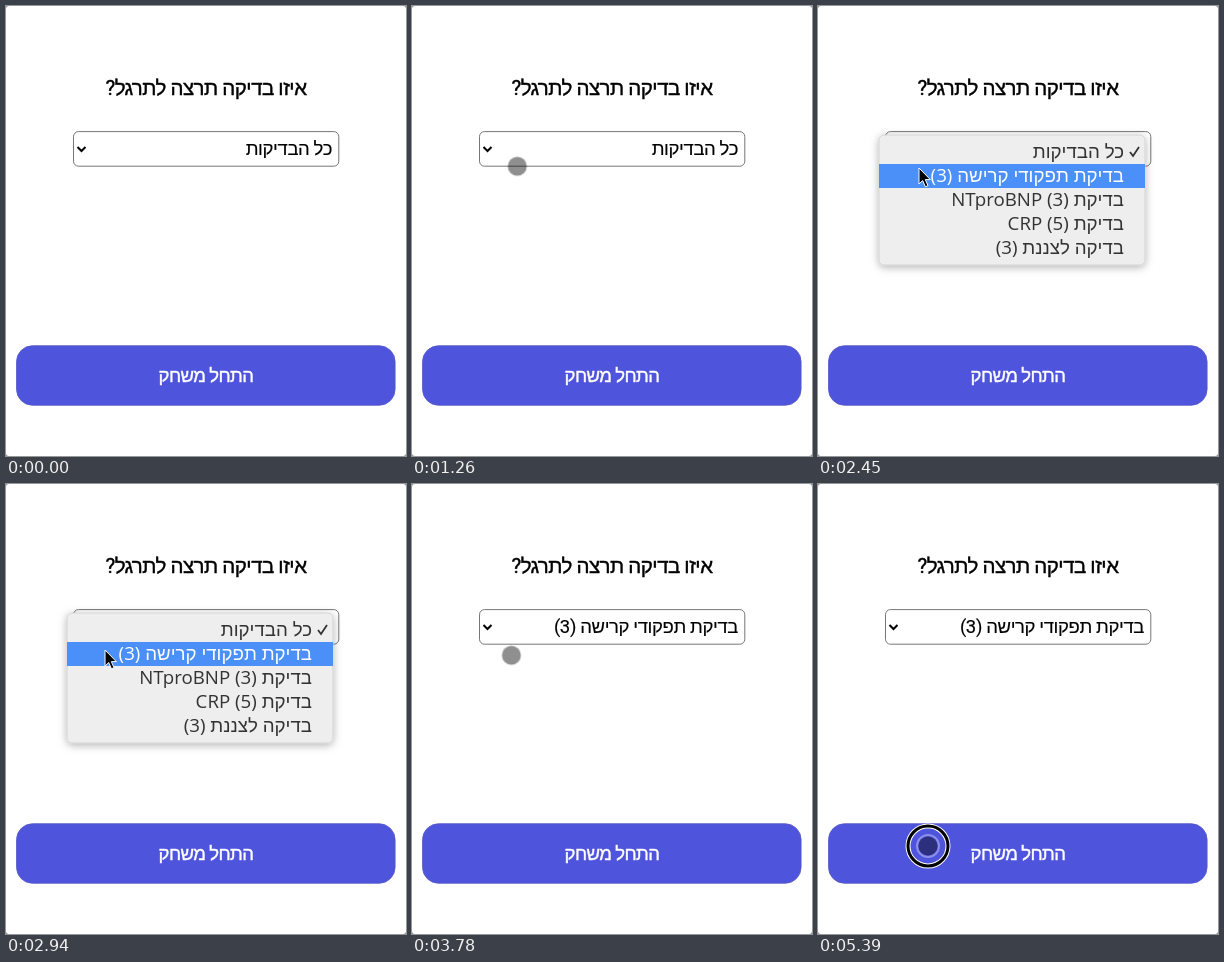
These frames come from a looping animation (400 px wide and 450 px high, 5460 ms). An HTML page:

```html
<!DOCTYPE html>
<html lang="he">
<head>
<meta charset="utf-8">
<title>בחירת בדיקה</title>
<style>
html, body { margin: 0; height: 100%; overflow: hidden; background: #fff; }
svg { display: block; width: 400px; height: 450px; }
text { direction: rtl; font-family: Roboto, "Open Sans", "Liberation Sans", sans-serif; }
.title { font-size: 20.5px; letter-spacing: -.5px; stroke: #000; stroke-width: .4; }
.value { font-size: 18.5px; letter-spacing: -.38px; stroke: #000; stroke-width: .15; }
.start { font-size: 18.5px; letter-spacing: -.6px; fill: #fff; stroke: #fff; stroke-width: .4; }
.menu text { font-family: "Open Sans", "Liberation Sans", sans-serif; font-size: 18.7px; fill: #333; }
.menu .lit text { fill: #fff; }
.mid { text-anchor: middle; }
.anim, .anim * { animation-duration: 5460ms; animation-iteration-count: infinite; }
.all, .picked, .menu, .lit, .ring, .arrow, .dot { animation-timing-function: step-end; }

.all { animation-name: all; }
.picked { animation-name: picked; }
.menu { animation-name: menu; }
.lit { animation-name: lit; }
.arrow { animation-name: arrow; }
.dot { animation-name: dot; }
.ring { animation-name: ring; }
.path { animation-name: path; animation-timing-function: ease-in-out; }

@keyframes all { 0% { opacity: 1 } 64.74%, 100% { opacity: 0 } }
@keyframes picked { 0% { opacity: 0 } 64.74%, 100% { opacity: 1 } }
@keyframes menu {
  0% { opacity: 0 } 30.77% { opacity: 1 }
  64.1% { opacity: 1; animation-timing-function: linear }
  66.6%, 100% { opacity: 0 }
}
@keyframes lit { 0% { opacity: 0 } 32.05% { opacity: 1 } 62.82% { opacity: 0 } 64.1%, 100% { opacity: 1 } }
@keyframes arrow { 0% { opacity: 0 } 30.77% { opacity: 1 } 66.6%, 100% { opacity: 0 } }
@keyframes dot { 0% { opacity: 0 } 8.97% { opacity: 1 } 30.77% { opacity: 0 } 66.6%, 100% { opacity: 1 } }
@keyframes ring { 0% { opacity: 0 } 28.21% { opacity: 1 } 30.77% { opacity: 0 } 97.44%, 100% { opacity: 1 } }
@keyframes path {
  0%, 8.97% { transform: translate(300px, 462px) }
  21.8%, 25% { transform: translate(105.3px, 160.3px) }
  32%, 44.87% { transform: translate(102px, 163px) }
  60%, 63.5% { transform: translate(99px, 169px) }
  67%, 75% { transform: translate(99.4px, 171.3px) }
  85.9% { transform: translate(100.5px, 327.5px) }
  94.9%, 100% { transform: translate(110px, 362px) }
}
</style>
</head>
<body>
<svg class="anim" viewBox="0 0 400 450">
  <defs>
    <filter id="shade" x="-10%" y="-15%" width="120%" height="130%">
      <feDropShadow dx="0" dy="2" stdDeviation="4" flood-color="#000" flood-opacity=".3"/>
    </filter>
    <path id="corner" d="M0 0h3a3 3 0 0 0-3 3z" fill="#888"/>
  </defs>
  <use href="#corner"/>
  <use href="#corner" transform="translate(400) scale(-1 1)"/>
  <use href="#corner" transform="translate(0 450) scale(1 -1)"/>
  <use href="#corner" transform="translate(400 450) scale(-1)"/>

  <text class="title mid" x="200" y="89">איזו בדיקה תרצה לתרגל?</text>

  <rect x="67.5" y="125.6" width="265.3" height="34.6" rx="5" fill="#fff" stroke="#767676"/>
  <path d="M71.5 141l4 4 4-4" fill="none" stroke="#000" stroke-width="2"/>
  <text class="value all" x="326" y="149">כל הבדיקות</text>
  <text class="value picked" x="326" y="149">בדיקת תפקודי קרישה (3)</text>

  <rect x="10.5" y="339.7" width="378.6" height="59.6" rx="16" fill="#4f54dc" stroke="#5659c4" stroke-width=".8"/>
  <text class="start mid" x="200" y="376">התחל משחק</text>

  <g class="menu">
    <rect x="61" y="129" width="266" height="130" rx="5" fill="#eee" stroke="#c4c4c4" stroke-width=".6" filter="url(#shade)"/>
    <path d="M312 146l3 4 6-9" fill="none" stroke="#333" stroke-width="1.8"/>
    <text x="306" y="152">כל הבדיקות</text>
    <text x="306" y="176">בדיקת תפקודי קרישה (3)</text>
    <text x="306" y="200">בדיקת (3) NTproBNP</text>
    <text x="306" y="224">בדיקת (5) CRP</text>
    <text x="306" y="248">בדיקה לצננת (3)</text>
    <g class="lit">
      <rect x="61" y="158" width="266" height="24" fill="#4b8ff8"/>
      <text x="306" y="176">בדיקת תפקודי קרישה (3)</text>
    </g>
  </g>

  <g class="path">
    <g class="ring" fill="none">
      <circle r="20" stroke="#fff" stroke-width="5"/>
      <circle r="20" stroke="#000" stroke-width="3"/>
      <circle r="11" stroke="#8b8fe8" stroke-width="2"/>
    </g>
    <circle class="dot" r="9.5" fill="#000" fill-opacity=".44"/>
    <path class="arrow" d="M-1-1v16l3.7-3.4 2.7 6.2 2.6-1.1-2.7-6.1h5z" fill="#000" stroke="#fff"/>
  </g>
</svg>
</body>
</html>
```
